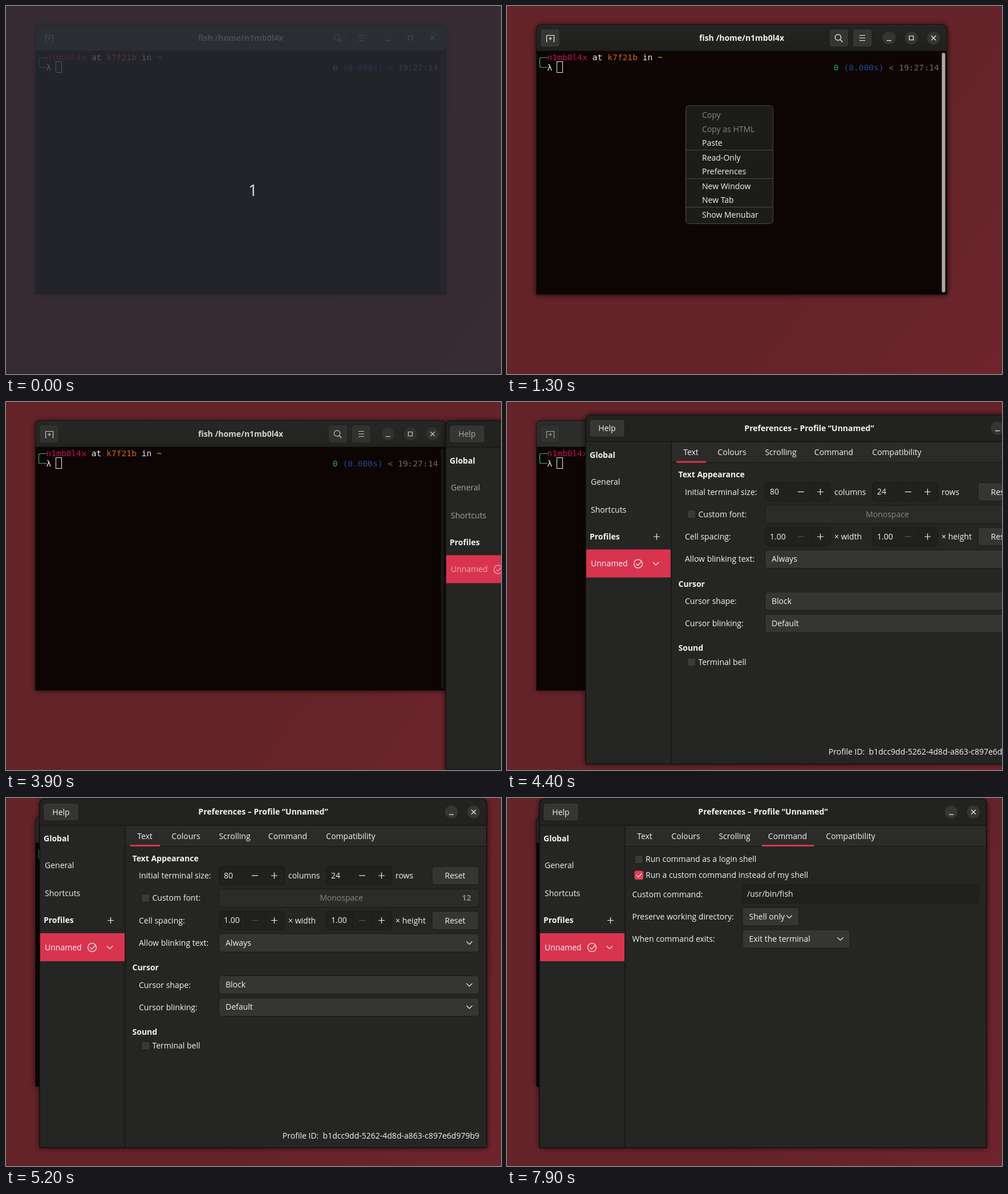
These frames come from a looping animation (868 px wide and 645 px high, 8000 ms). An HTML page:

```html
<!DOCTYPE html>
<html lang="en">
<head>
<meta charset="utf-8">
<title>Terminal preferences</title>
<style>
html, body { margin: 0; width: 100%; height: 100%; overflow: hidden; background: #632329; }
svg { display: block; width: 100vw; height: 100vh; }
text { font: 14px "Open Sans", "Noto Sans", sans-serif; fill: #f4f4f2; white-space: pre; }
.b { font-weight: 700; }
.mono { font: 14.62px "DejaVu Sans Mono", monospace; }
.ico { fill: none; stroke: #f4f4f2; stroke-width: 1.2; }
.off { fill: #868684; }
</style>
</head>
<body>
<svg id="stage" viewBox="0 0 868 645" preserveAspectRatio="none"></svg>
<script>
const LOOP = 8000, STEP = 100;
const USER = 'n1mb0l4x', HOST = 'k7f21b';
const BTN = '#353533', FIELD = '#20201f', ACCENT = '#d9344f';

// Drawing helpers; text is placed by its vertical centre.
const text = (x, cy, s, cls = '', extra = '') =>
  `<text x="${x}" y="${cy + 5}" class="${cls}" ${extra}>${s}</text>`;
const mid = (x, cy, s, cls) => text(x, cy, s, cls, 'text-anchor="middle"');
const rect = (x, y, w, h, fill, extra = '') =>
  `<rect x="${x}" y="${y}" width="${w}" height="${h}" fill="${fill}" ${extra}/>`;
const box = (x, y, w, h, fill = BTN) =>
  rect(x + .5, y + .5, w - 1, h - 1, fill, 'rx="5" stroke="#191918"');
const icon = (d, extra = '') => `<path class="ico" d="${d}" ${extra}/>`;
const disc = (x, y) => `<circle cx="${x}" cy="${y}" r="11.3" fill="${BTN}"/>`;
const minus = (x, y, extra) => icon(`M${x - 5.5} ${y}h11`, extra);
const plus = (x, y) => icon(`M${x - 5.5} ${y}h11M${x} ${y - 5.5}v11`);
const chevron = (x, y) => icon(`M${x - 5} ${y - 2.5}l5 5l5-5`);
const group = (id, body, extra = '') => `<g id="${id}" ${extra}>${body}</g>`;
const minimise = (x, y) => disc(x, y) + icon(`M${x - 4} ${y + 4.5}h8`);
const close = (x, y) => disc(x, y) + icon(`M${x - 4} ${y - 4}l8 8m0-8l-8 8`, 'stroke-width="1.5"');
const mono = (x, y, parts) => `<text class="mono" x="${x}" y="${y}">` +
  parts.map(([s, c]) => `<tspan fill="${c}">${s}</tspan>`).join('') + '</text>';
// Window outline with round top corners
const frame = (x, y, w, h) =>
  `M${x} ${y + h}V${y + 10}q0-10 10-10H${x + w - 10}q10 0 10 10V${y + h}z`;

function terminal() {
  const bar = frame(52, 33, 719, 46);
  return group('termShade', `<path d="${frame(51, 33, 721, 473)}" fill="#000" filter="url(#blur)"/>`) +
    `<path d="${frame(51.5, 32.5, 720, 473)}" fill="#0d0504" stroke="#151213"/>` +
    `<path d="${bar}" fill="url(#bar)"/>` +
    `<path id="barDim" d="${bar}" fill="#2c2c2b"/>` +
    rect(52, 78, 719, 1, '#171716') +
    group('termHead',
      box(58, 39.5, 35, 33) + box(564.5, 39.5, 35, 33) + box(605.5, 39.5, 35, 33) +
      icon('M69.5 62V51.5h13V62M76 54v6m-3-3h6M69 62.5h2m10 0h2') +
      '<circle class="ico" cx="580.5" cy="55" r="5.2"/>' + icon('M584.3 59l4 4') +
      icon('M618 51.5h10m-10 4.5h10m-10 4.5h10') +
      minimise(670, 56) + disc(709, 56) + icon('M705.5 52.5h7v7h-7z', 'stroke-width="1.4"') +
      close(748, 56)) +
    group('termTitle', mid(411.5, 55.5, `fish /home/${USER}`, 'b')) +
    icon('M71 90.5H60q-2.5 0-2.5 2.5v12q0 2.5 2.5 2.5h11', 'style="stroke:#32b57a"') +
    mono(70.6, 95, [[USER, '#c4115d'], [' at ', '#f0f0ee'], [HOST, '#d1611f'],
      [' in ', '#f0f0ee'], ['~', '#83d61b']]) +
    mono(70.6, 112.5, [['λ', '#f0f0ee']]) +
    mono(572.8, 112.5, [['0', '#2aa56c'], [' (0.000s)', '#204990'], [' &lt; 19:27:14', '#6d6968']]) +
    rect(87.5, 97.5, 10, 19, 'none', 'id="hollow" stroke="#efefed"') +
    rect(88, 98, 9, 18, '#f4f4f2', 'id="block"') +
    rect(762.5, 82, 6, 420, '#fff', 'rx="3" id="slider"');
}

function menu() {
  const items = ['Copy', 'Copy as HTML', 'Paste', 'Read-Only', 'Preferences',
    'New Window', 'New Tab', 'Show Menubar'];
  const row = i => 191 + i * 24.5 + (i > 2) + (i > 4) + (i > 6);
  return rect(313.5, 174.5, 153, 207, '#1c1c1b', 'rx="6" stroke="#4a4a48"') +
    rect(314, 227.5, 152, 24.5, '#3a3a38', 'id="hover"') +
    [252.5, 302.5, 352.5].map(y => rect(314, y - .5, 152, 1, '#4a4a48')).join('') +
    items.map((s, i) => text(342, row(i), s, i < 2 ? 'off' : '')).join('');
}

function spinner(x, y, value, floor) {
  return box(x, y, 116, 33, FIELD) + rect(x + 47, y + 1, 1, 31, '#191918') +
    rect(x + 81, y + 1, 1, 31, '#191918') + text(x + 9, y + 16, value) +
    minus(x + 63.5, y + 16.5, floor ? 'opacity=".25"' : '') + plus(x + 97.5, y + 16.5);
}
const combo = (x, y, w, s) => box(x, y, w, 33) + text(x + 12, y + 16, s) + chevron(x + w - 17.5, y + 16.5);
const check = (cy, id = '') => rect(235.5, cy - 7, 14.5, 14.5, '#393937',
  `rx="2.5" stroke="#191918" ${id && `id="${id}"`}`);

function textPage() {
  const sizes = (y, label, a, b, unitA, unitB, floor) =>
    text(231, y, label) + spinner(371, y - 16.5, a, floor) + text(493, y, unitA) +
    spinner(559, y - 16.5, b, floor) + text(681, y, unitB) +
    box(744.5, y - 16.5, 83, 33) + mid(785.5, y, 'Reset');
  return text(219.5, 105.5, 'Text Appearance', 'b') +
    sizes(136, 'Initial terminal size:', '80', '24', 'columns', 'rows') +
    check(175) + text(254.5, 175, 'Custom font:') + box(371, 159, 457, 33, '#2b2b29') +
    mid(586, 175, 'Monospace', 'off') + mid(805.5, 175, '12', 'off b') +
    sizes(214.5, 'Cell spacing:', '1.00', '1.00', '× width', '× height', true) +
    text(231, 253.5, 'Allow blinking text:') + combo(371, 237.5, 457, 'Always') +
    text(219.5, 297, 'Cursor', 'b') +
    text(231, 327.5, 'Cursor shape:') + combo(371, 311, 457, 'Block') +
    text(231, 366.5, 'Cursor blinking:') + combo(371, 350, 457, 'Default') +
    text(219.5, 409.5, 'Sound', 'b') + check(434) + text(254.5, 434, 'Terminal bell') +
    text(828, 591.5, 'Profile ID:  b1dcc9dd-5262-4d8d-a863-c897e6d979b9', '', 'text-anchor="end"');
}

function commandPage() {
  const at = (y, id, on) => rect(224, y - 7, 14.5, 14.5, on ? '#e0425b' : '#393937',
    `rx="2.5" stroke="${on ? '#e0425b' : '#191918'}" id="${id}"`);
  return at(107.5, 'check1') + text(243, 107, 'Run command as a login shell') +
    at(135, 'check2', true) + icon('M227.5 135.5l3 3l5.5-6', 'stroke-width="2"') +
    text(243, 135, 'Run a custom command instead of my shell') +
    text(219.5, 168.5, 'Custom command:') + box(412.5, 152, 415.5, 33, FIELD) +
    text(421, 168, '/usr/bin/fish') +
    text(219.5, 207.5, 'Preserve working directory:') + combo(412.5, 191.5, 100, 'Shell only') +
    text(219.5, 246.5, 'When command exits:') + combo(412.5, 230.5, 189.5, 'Exit the terminal');
}

function prefs() {
  const tabs = [[241.5, 'Text'], [313.5, 'Colours'], [399, 'Scrolling'],
    [492, 'Command'], [602.5, 'Compatibility']];
  return `<path d="${frame(57, 1, 784, 612)}" fill="#000" opacity=".75" filter="url(#blur)"/>` +
    `<path d="${frame(57, 1.5, 784, 611.5)}" fill="#252523" stroke="#121211" stroke-width="1.5"/>` +
    `<path d="${frame(58, 2, 782, 46)}" fill="#222220"/>` +
    rect(58, 47, 782, 1.5, '#171716') + rect(208, 49, 632, 35, '#2b2b29') +
    rect(208, 84, 632, 1, '#191918') + rect(206, 48, 1.7, 565, '#171716') +
    box(63, 8.5, 63, 32) + rect(58, 237, 148, 49, ACCENT) +
    group('prefHead', mid(449, 24, 'Preferences – Profile “Unnamed”', 'b') +
      text(64, 71, 'Global', 'b') + text(64, 214, 'Profiles', 'b')) +
    group('prefText', mid(94.5, 24.5, 'Help') + minimise(779, 24.5) + close(818, 24.5) +
      text(66, 118, 'General') + text(66, 167, 'Shortcuts') + plus(181.5, 214.5) +
      text(66, 261.5, 'Unnamed') + '<circle class="ico" cx="149" cy="262" r="7.4"/>' +
      icon('M145.5 262l3 3l6-6.5', 'stroke-width="1.6"') + chevron(180, 262) +
      tabs.map(([x, s]) => mid(x, 66.5, s)).join('')) +
    rect(276, 82, 75, 2, '#5b5b59', 'id="tabHover"') +
    rect(216, 82, 52, 3, ACCENT, 'id="tabLine"') +
    group('page1', textPage()) + group('page2', commandPage());
}

document.getElementById('stage').innerHTML = `<defs>
  <linearGradient id="wall" gradientUnits="userSpaceOnUse" x1="0" y1="0" x2="868" y2="645">
    <stop offset="0" stop-color="#632329"/><stop offset=".6" stop-color="#632329"/>
    <stop offset="1" stop-color="#6e242c"/></linearGradient>
  <linearGradient id="bar" x2="0" y2="1">
    <stop offset="0" stop-color="#252623"/><stop offset="1" stop-color="#1f201e"/></linearGradient>
  <filter id="blur" x="-10%" y="-10%" width="120%" height="120%"><feGaussianBlur stdDeviation="5"/></filter>
  </defs>` + rect(0, 0, 868, 645, 'url(#wall)') + terminal() + group('menu', menu()) +
  group('prefs', prefs()) +
  group('count', rect(0, 0, 868, 645, '#292e35', 'opacity=".782"') + rect(0, 644, 868, 1, '#202226') +
    '<text x="433" y="333" text-anchor="middle" style="font-size:28px;fill:#e2e4e6">1</text>');

const el = {};
document.querySelectorAll('[id]').forEach(n => el[n.id] = n);
const show = (id, on) => el[id].style.display = on ? '' : 'none';
const set = (id, attrs) => Object.entries(attrs).forEach(([k, v]) => el[id].setAttribute(k, v));
const within = (t, a, b) => t >= a && t < b;

// Time, then offset of the preferences window from its resting place
const drag = [[4000, 714, 31.5], [4100, 610, 31], [4200, 390, 29], [4300, 190, 26],
  [4400, 81, 21.5], [4600, 42, 9], [4800, 18.5, 1], [4900, 13, .5], [5200, 2, 0],
  [5300, 2, 0], [5600, 0, 0]];
function dragAt(t) {
  if (t <= drag[0][0]) return drag[0].slice(1);
  const i = drag.findIndex(k => k[0] >= t);
  if (i < 0) return [0, 0];
  const [a, b] = [drag[i - 1], drag[i]], p = (t - a[0]) / (b[0] - a[0]);
  return [1, 2].map(k => a[k] + (b[k] - a[k]) * p);
}

function update(now) {
  const t = Math.floor(now % LOOP / STEP) * STEP;
  show('count', t < 100);

  // Terminal: focus, cursor
  const dim = t < 300 ? 1 : t < 500 ? (500 - t) / 300 : t < 3900 ? 0 : t < 4100 ? .5 : 1;
  set('barDim', { opacity: dim * dim });
  set('termHead', { opacity: 1 - dim * .4 });
  set('termTitle', { opacity: 1 - dim * .3 });
  set('termShade', { opacity: .8 - dim * .3 });
  set('slider', { opacity: t >= 3900 ? .07 : .07 + .58 * (1 - dim) });
  show('hollow', t < 300 || within(t, 1300, 2600) || t >= 3900);
  show('block', within(t, 300, 900) || within(t, 2600, 3200) || within(t, 3700, 3900));

  // Context menu
  show('menu', within(t, 1300, 2400));
  show('hover', t >= 1800);
  set('hover', { y: t < 1900 ? 227.5 : t < 2000 ? 253 : 277.5 });

  // Preferences window: opens, gains focus, is dragged
  const [dx, dy] = dragAt(t);
  const grow = t < 2800 ? 1 - .2 * Math.pow(2, -(t - 2600) / 50) : 1;
  show('prefs', t >= 2600);
  set('prefs', {
    transform: `translate(${dx} ${dy}) translate(449 307) scale(${grow}) translate(-449 -307)`,
    opacity: Math.min(1, .5 + Math.max(0, t - 2600) / 400)
  });
  set('prefText', { opacity: t < 3900 ? .55 : t < 4100 ? .62 : 1 });
  set('prefHead', { opacity: t < 3900 ? .65 : 1 });

  // Tabs and pages
  const onCommand = t >= 7200;
  set('tabLine', onCommand ? { x: 447, width: 91 } : { x: 216, width: 52 });
  show('tabHover', within(t, 5900, 6600) || within(t, 6700, 6900) || within(t, 7000, 7200));
  set('tabHover', t < 6600 ? { x: 276, width: 75 } : t < 6900 ? { x: 359, width: 80 } : { x: 447, width: 91 });
  show('page1', !onCommand);
  show('page2', onCommand);
  set('check1', { fill: within(t, 7700, 7800) ? '#444442' : '#393937' });
  set('check2', { fill: t < 7800 ? ACCENT : '#e0425b' });
}

const start = performance.now();
(function tick() {
  update(performance.now() - start);
  requestAnimationFrame(tick);
})();
</script>
</body>
</html>
```
